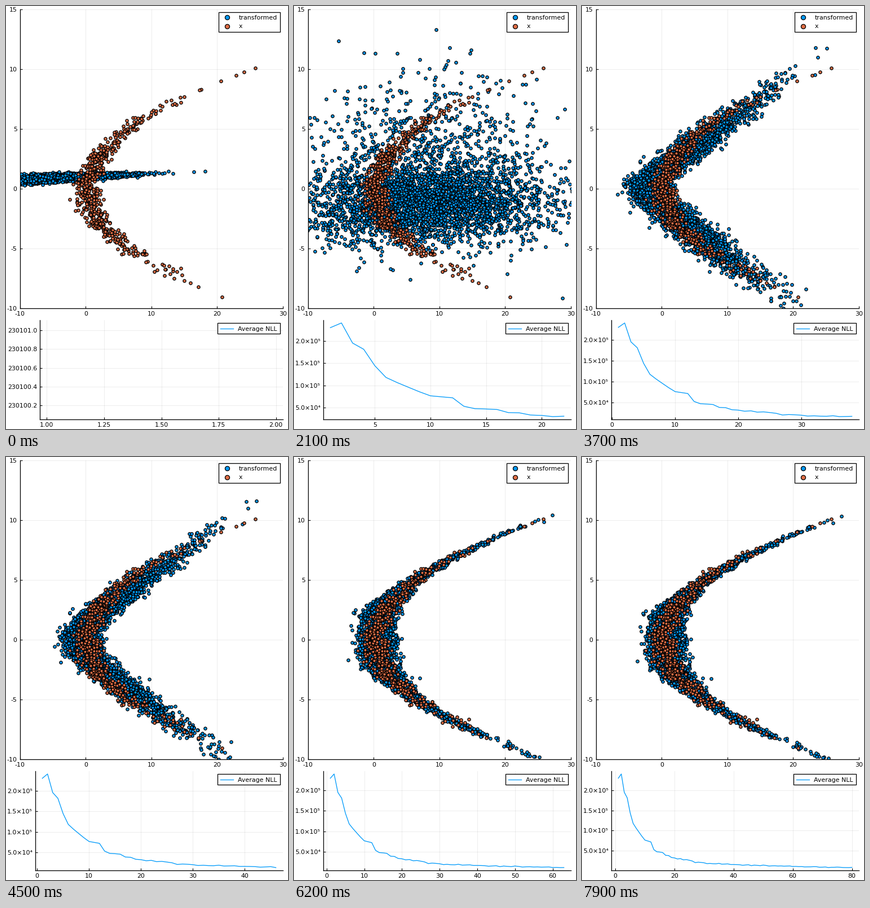
Recreate the animation shown at these times as a matplotlib script. Size 500x750 px, loop 8000 ms.

```python
import math

import matplotlib.pyplot as plt
import numpy as np
from matplotlib.animation import FuncAnimation
from matplotlib.patches import Rectangle

W, H = 500, 750
PX = 0.72  # points per pixel at 100 dpi
FRAMES = 80
BLUE, ORANGE = "#009AFA", "#E26F46"
RIGHT = 491

plt.rcParams.update({
    "font.family": "DejaVu Sans",
    "font.size": 11 * PX,
    "axes.linewidth": 1.3 * PX,
})

rng = np.random.default_rng(7)


def loss_curve():
    """A falling loss through a few key points, with a small wobble later on."""
    key_steps = [1, 2, 3, 4, 5, 6, 8, 10, 12, 13, 20, 30, 45, 80]
    key_values = [2.3010008, 2.407, 1.954, 1.814, 1.443, 1.18, .96,
                  .765, .72, .53, .345, .2, .143, .082]
    steps = np.arange(1, FRAMES + 1)
    curve = np.exp(np.interp(steps, key_steps, np.log(key_values)))
    wobble = rng.normal(0, 0.05, FRAMES) * (steps > 13)
    return 1e5 * curve * (1 + wobble)


def banana_sample():
    y = rng.normal(0, 3.8, 580)
    y = y[np.abs(y) < 7.7]
    x = y ** 2 / 4 + rng.normal(0.2, 1, y.size)
    tips = np.array([10.1, 9.75, 9.5, 9.0, 8.3, 8.25, -7.9, -8.2, -9.05])
    return np.r_[x, tips ** 2 / 4 + 0.3], np.r_[y, tips]


LOSS = loss_curve()

# Latent samples that the flow pushes towards the banana shape.
COUNT = 4000
z, e, n = rng.normal(size=(3, COUNT))
u = rng.random(COUNT)
t = 3.5 * z


def streak():
    x = -5 + 5.7 * e
    spread = np.clip(0.13 - 0.006 * x, 0.03, 0.18)
    return x, 1.03 + 0.026 * x + spread * z


def wide_band():
    x = 20 + 11.5 * e
    upper = u < np.clip(0.35 - 0.015 * x, 0.03, 0.45)
    y = -0.2 + 0.0008 * np.clip(x, 0, 40) ** 2 + 0.75 * z
    return x, y + upper * (2.7 - 0.03 * x + 0.3 * n) - 0.5 * (x < 0)


def cloud():
    x = 8 + 9.2 * e
    y = np.where(u < 0.23, 2.6 + 3.4 * z, -1.1 + 1.65 * z)
    return x, y - 0.4 * (x < 0)


def wedge():
    x = 2.35 * np.abs(t) - 4 + 1.7 * e
    near_tip = np.clip(np.abs(t) / 3, 0.4, 1)
    return x, t + 0.5 * np.exp(-np.abs(t)) + np.where(t < 0, 0.8, 0.4) * near_tip * n


def thick_bow():
    return 2.7 * np.sqrt(t ** 2 + 4) - 6.1 + 1.35 * e, t + 0.2 * n


def bow(center):
    flat = t ** 4 / (t ** 4 + 40)
    width = 0.45 + 0.85 / (1 + (np.abs(t - center) / 4) ** 6)
    return t ** 2 / 4 * flat + 0.7 + width * e, t + 0.08 * n


KEYS = [0, 11, 21, 29, 45, 62, 79]
SHAPES = [np.array(s) for s in (
    streak(), wide_band(), cloud(), wedge(), thick_bow(), bow(0), bow(-0.4))]


def flow(frame):
    i = min(np.searchsorted(KEYS, frame, side="right") - 1, len(KEYS) - 2)
    w = (frame - KEYS[i]) / (KEYS[i + 1] - KEYS[i])
    x, y = (1 - w) * SHAPES[i] + w * SHAPES[i + 1]
    sway = 0.1 * math.sin(frame * 2.1) * min(1, frame / 30)
    return x + sway, y - 0.5 * sway


def padded(values):
    lo, hi = min(values), max(values)
    if hi == lo:
        hi = lo + 1
    pad = 0.03 * (hi - lo)
    return lo - pad, hi + pad


def nice_ticks(lo, hi):
    """Pick round ticks by tick count, coverage and roundness of the step."""
    span, best, result = hi - lo, -1, None
    power = math.floor(math.log10(span))
    for p in (power - 1, power):
        for q, nice in ((1, 1), (5, .9), (2, .7), (2.5, .5), (3, .2)):
            step = q * 10.0 ** p
            ticks = np.arange(math.ceil(lo / step), math.floor(hi / step) + 1) * step
            if not 4 <= len(ticks) <= 9:
                continue
            count = 1 - abs(len(ticks) - 5) / 5
            score = count / 4 + span / (ticks[-1] - ticks[0]) / 2 + nice / 4
            if score > best - 1e-9:
                best, result = score, ticks
    return result


def decimals(values, least):
    d = least
    while not np.allclose(values, np.round(values, d), rtol=0, atol=1e-6):
        d += 1
    return d


def plain_labels(ticks):
    d = decimals(ticks, 0)
    return [f"{v:.{d}f}" for v in ticks]


def power_labels(ticks):
    exps = np.floor(np.log10(ticks) + 1e-9).astype(int)
    mantissas = ticks / 10.0 ** exps
    d = decimals(mantissas, 1)
    return [f"{m:.{d}f}×10{'⁰¹²³⁴⁵⁶⁷⁸⁹'[k]}" for m, k in zip(mantissas, exps)]


def box(left, top, right, bottom):
    return [left / W, 1 - bottom / H, (right - left) / W, (bottom - top) / H]


def make_axes(left, top, bottom):
    ax = fig.add_axes(box(left, top, RIGHT, bottom))
    ax.spines[["top", "right"]].set_visible(False)
    ax.set_axisbelow(True)
    ax.grid(color="black", alpha=0.1, linewidth=0.7 * PX)
    ax.tick_params(direction="in", length=4 * PX, width=1.1 * PX, pad=5 * PX)
    return ax


def dots(ax, x, y, color, size=5.3):
    line, = ax.plot(x, y, "o", ms=size * PX, mfc=color, mec="black", mew=1.3 * PX)
    line.set_snap(False)
    return line


def legend_box(left, top, right, bottom):
    overlay.add_patch(Rectangle((left, top), right - left, bottom - top,
                                fc="white", ec="black", lw=1.3 * PX))


fig = plt.figure(figsize=(W / 100, H / 100), dpi=100, facecolor="white")

main = make_axes(24.7, 6, 536)
main.set(xlim=(-10, 30), ylim=(-10, 15))
main.set_xticks(range(-10, 31, 10), [str(v) for v in range(-10, 31, 10)])
main.set_yticks(range(-10, 16, 5), [str(v) for v in range(-10, 16, 5)])
moving = dots(main, [], [], BLUE)
dots(main, *banana_sample(), ORANGE)

chart = make_axes(60, 557, 733)
curve, = chart.plot([], [], color=BLUE, lw=1.3 * PX)

overlay = fig.add_axes([0, 0, 1, 1])
overlay.set(xlim=(0, W), ylim=(H, 0))
overlay.axis("off")
legend_box(377, 11, 486, 46)
for row, (label, color) in enumerate((("transformed", BLUE), ("x", ORANGE))):
    dots(overlay, [392], [20 + 15.5 * row], color, 8)
    overlay.text(413, 24 + 15.4 * row, label)
legend_box(375, 562, 486, 581)
overlay.plot([380, 403], [572.4, 572.4], color=BLUE, lw=1.3 * PX)
overlay.text(411, 576, "Average NLL")


def update(frame):
    moving.set_data(*flow(frame))
    steps = np.arange(1, frame + 2)
    losses = LOSS[:frame + 1]
    curve.set_data(steps, losses)

    xlim, ylim = padded(steps), padded(losses)
    xticks, yticks = nice_ticks(*xlim), nice_ticks(*ylim)
    ylabels = power_labels(yticks) if frame else plain_labels(yticks)
    left = 52 + 7 * (len(ylabels[0]) - 7) if frame else 60
    chart.set_position(box(left, 557, RIGHT, 733))
    chart.set_xticks(xticks, plain_labels(xticks))
    chart.set_yticks(yticks, ylabels)
    chart.set(xlim=xlim, ylim=ylim)
    return moving, curve


animation = FuncAnimation(fig, update, frames=FRAMES, interval=100,
                          repeat=True, repeat_delay=0, blit=False)
plt.show()
```
